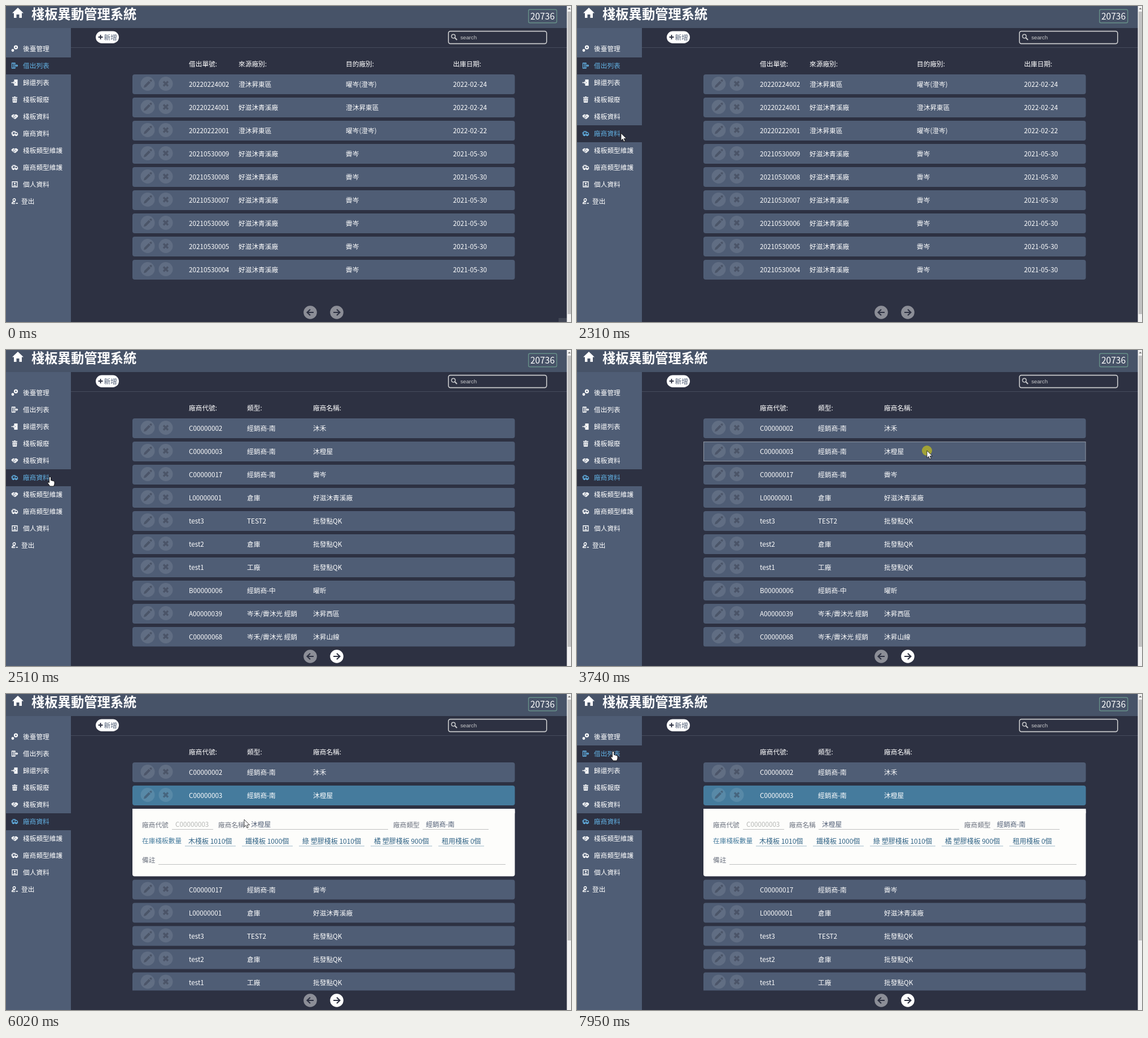
Recreate the animation shown at these times as an HTML page. Size 1001 by 559 pixels, loop 8 s.

```html
<!DOCTYPE html>
<html lang="zh-Hant">
<head>
<meta charset="utf-8">
<title>棧板異動管理系統</title>
<style>
html, body { margin: 0; width: 100%; height: 100%; overflow: hidden; background: #2d3142; }
svg { display: block; width: 1001px; height: 559px; }
text { font: 11.7px 'Noto Sans CJK TC', 'Noto Sans CJK JP', 'Noto Sans', sans-serif; fill: #fff; white-space: pre; }
.title { font-size: 23.3px; font-weight: 700; }
.badge { font-size: 15.5px; }
.search { font: 9.7px 'Liberation Sans', Arial, sans-serif; fill: #c8c9cb; }
.item { color: #fff; }
.item text { fill: currentColor; }
.item > rect { fill: none; }
.item.on { color: #62b0e2; }
.item.on > rect { fill: #2d3142; }
.row > rect { fill: #4f5d75; x: 224px; y: 0; width: 677.5px; height: 35px; rx: 4px; }
.row.hover > rect { stroke: #8f98a6; x: 224.5px; y: .5px; width: 676.5px; height: 34px; rx: 0; }
.row.open > rect { fill: #457b9d; }
.btn { fill: #fff; opacity: .1; }
.glyph { fill: #2d3142; opacity: .4; }
.line { fill: none; stroke: currentColor; stroke-width: 2.6; }
.label { fill: #6d7380; }
.value { fill: #4f5d75; }
.dim { fill: #b4b6b4; }
.stock { fill: #457b9d; }
.count { fill: #2f6285; font-size: 12px; }
.off { opacity: .45; }
</style>
</head>
<body>
<svg id="stage" viewBox="0 0 1001 559"></svg>
<script>
const text = (x, mid, s, cls = '', size = 11.7) =>
  `<text x="${x}" y="${mid + size * 0.37}" class="${cls}">${s}</text>`;
const rect = (x, y, w, h, fill, r = 0) =>
  `<rect x="${x}" y="${y}" width="${w}" height="${h}" fill="${fill}" rx="${r}"/>`;
const rule = (x1, x2, y, color) =>
  `<path d="M${x1} ${y}H${x2}" stroke="${color}" fill="none"/>`;

// Icons on a 24 unit grid
const pallet = '<path fill="currentColor" d="M0 9L7 4 12 6 17 4 24 9 22 14 14 21 10 20 2 14Z"/><path d="M6 10L11 8 18 14M5 13L11 18M9 12L14 17" fill="none" stroke="#4f5d75" stroke-width="1.8"/>';
const truck = '<path class="line" d="M4 5H13V17H2M0 9H7M0 13H6M13 8H18L22 12V17H13"/><g fill="currentColor"><circle cx="7" cy="18" r="3.5"/><circle cx="17" cy="18" r="3.5"/></g>';
const icons = [
  '<circle class="line" style="stroke-width:4.5" cx="16" cy="7" r="5"/><circle class="line" style="stroke-width:4" cx="5" cy="18" r="2.8"/>',
  '<path class="line" d="M2 3H13V21H2ZM8 3V21M14 12H22M18 8L22 12 18 16"/>',
  '<path fill="currentColor" d="M10 1H22V23H10V16L16 12 10 8Z"/><path class="line" d="M0 12H11M8 8L12 12 8 16"/>',
  '<path fill="currentColor" d="M3 3H9L10 1H14L15 3H21V6H3ZM4 8H20L19 23H5Z"/><path d="M9 11V20M15 11V20" stroke="#4f5d75" stroke-width="2"/>',
  pallet, truck, pallet, truck,
  '<path class="line" d="M3 3H21V21H3Z"/><circle cx="12" cy="9" r="3" fill="currentColor"/><path fill="currentColor" d="M6 18Q12 10 18 18Z"/>',
  '<circle class="line" cx="10" cy="7" r="4.5"/><path class="line" d="M2 21Q2 14 10 14L13 15M2 20H13M16 19H23"/>'
];
const menu = ['後臺管理', '借出列表', '歸還列表', '棧板報廢', '棧板資料', '廠商資料',
  '棧板類型維護', '廠商類型維護', '個人資料', '登出'];

const lent = '20220224002,澄沐昇東區,曜岑(澄岑),2022-02-24|20220224001,好滋沐青溪廠,澄沐昇東區,2022-02-24|20220222001,澄沐昇東區,曜岑(澄岑),2022-02-22'
  .split('|').map(r => r.split(','));
for (let n = 9; n > 3; n--) lent.push(['2021053000' + n, '好滋沐青溪廠', '霽岑', '2021-05-30']);
const firms = 'C00000002,經銷商-南,沐禾|C00000003,經銷商-南,沐橙屋|C00000017,經銷商-南,霽岑|L00000001,倉庫,好滋沐青溪廠|test3,TEST2,批發點QK|test2,倉庫,批發點QK|test1,工廠,批發點QK|B00000006,經銷商-中,曜昕|A00000039,岑禾/霽沐光 經銷,沐昇西區|C00000068,岑禾/霽沐光 經銷,沐昇山線'
  .split('|').map(r => r.split(','));

const row = (cells, cols, i) => `<g class="row" transform="translate(0 ${121 + 41 * i})"><rect/>
  <circle class="btn" cx="251" cy="16.5" r="12.5"/><circle class="btn" cx="283" cy="16.5" r="12.5"/>
  <path class="glyph" transform="translate(251 16.5)" d="M-7 7L-6 3 2-5 5-2-3 6ZM3-6L4.5-7.3Q6-8 7-7Q8-6 7.3-4.5L6-3Z"/>
  <path transform="translate(283 16.5)" d="M-4-4L4 4M4-4L-4 4" stroke="#2d3142" stroke-width="3.4" opacity=".4"/>
  ${cells.map((c, k) => text(cols[k], 18, c)).join('')}</g>`;
const table = (id, heads, cols, rows) => {
  const drawn = rows.map((r, i) => row(r, cols, i));
  return `<g id="${id}">${heads.map((h, k) => text(cols[k], 103, h)).join('')}
    <g clip-path="url(#list)">${drawn.slice(0, 2).join('')}<g class="rest">${drawn.slice(2).join('')}</g></g></g>`;
};

const field = (x1, x2, y, s, cls, color = '#bfc0c0') =>
  rule(x1, x2, y + 8.5, color) + text(x1 + 6, y, s, cls);
const stock = [[317, 407, '木棧板 1010個'], [418, 508, '鐵棧板 1000個'], [519, 635, '綠 塑膠棧板 1010個'],
  [646, 755, '橘 塑膠棧板 900個'], [766, 847, '租用棧板 0個']];
const panel = `<g id="panel">${rect(224, 203, 677.5, 119.5, '#fdfdfb', 4)}${rect(224, 203, 677.5, 8, '#fdfdfb')}
  ${text(241, 232, '廠商代號', 'label')}${field(294, 367, 231, 'C00000003', 'dim')}
  ${text(376, 232, '廠商名稱', 'label')}${field(428, 677, 231, '沐橙屋', 'value')}
  ${text(686, 232, '廠商類型', 'label')}${field(738, 855, 231, '經銷商-南', 'value')}
  ${text(241, 260, '在庫棧板數量', 'stock')}
  ${stock.map(([a, b, s]) => field(a, b, 260.5, s, 'count', '#9fb9c9')).join('')}
  ${text(241, 294, '備註', 'label')}${rule(270, 885, 301.5, '#bfc0c0')}</g>`;

const pager = (id, x, turn) => `<g id="${id}" class="off" transform="translate(${x} 542) rotate(${turn})">
  <circle r="11.8" fill="#fff"/><path d="M-6 0H5M0-5.3L5.5 0 0 5.3" fill="none" stroke="#2d3142" stroke-width="2.1"/></g>`;

const $ = id => document.getElementById(id);
$('stage').innerHTML = `
  <clipPath id="list"><rect x="220" y="115" width="690" height="409.5"/></clipPath>
  ${rect(0, 0, 1001, 559, '#2d3142')}${rect(0, 39, 115, 520, '#4f5d75')}${rect(0, 0, 994, 39, '#475368')}
  <path fill="#fff" d="M21 3L31 12.5H28V21H23.5V15H18.5V21H14V12.5H11Z"/>
  ${text(45, 14, '棧板異動管理系統', 'title', 23.3)}
  <rect x="925.7" y="6.2" width="50" height="23.6" rx="2.5" fill="none" stroke="#668f88" stroke-width="1.4"/>
  ${text(929, 18.7, '20736', 'badge', 15.5)}
  ${menu.map((s, i) => `<g class="item">${rect(0, 61 + 30 * i, 115, 30, '')}
    <g transform="translate(9.5 ${69.5 + 30 * i}) scale(.5)">${icons[i]}</g>${text(i < 9 ? 30 : 27, 76 + 30 * i, s)}</g>`).join('')}
  ${rule(115, 994, 73.5, '#464b5d')}
  ${rect(159, 44.5, 41, 21.5, '#fff', 10.7)}
  <path d="M163.5 55H171.5M167.5 51V59" stroke="#2d3142" stroke-width="2"/>
  ${text(173.5, 55.5, '新增', 'value')}
  <rect x="783.8" y="44.6" width="174" height="22" rx="3.5" fill="none" stroke="#c9cacc" stroke-width="1.6"/>
  <path d="M795.2 56.2L799 60" stroke="#c8c9cb" stroke-width="2"/><circle cx="792.6" cy="53.6" r="3.3" fill="none" stroke="#c8c9cb" stroke-width="1.5"/>
  ${text(805, 55.5, 'search', 'search', 9.7)}
  ${table('lent', ['借出單號:', '來源廠別:', '目的廠別:', '出庫日期:'], [324, 412, 602, 792], lent)}
  ${table('firms', ['廠商代號:', '類型:', '廠商名稱:'], [324, 427, 544], firms)}
  ${panel}${pager('prev', 539, 180)}${pager('next', 586, 0)}
  <g id="corner">${rect(979, 552, 15, 7, '#424755')}</g>
  ${rect(993.6, 0, 7.4, 559, '#f1f1f1')}<path d="M995.5 6L998 3 1000.5 6Z" fill="#777"/>
  <rect id="thumb" x="995" y="10" width="6" height="535" fill="#c1c1c1"/>
  <g id="mouse"><circle id="click" r="9" fill="#a1a236"/>
    <path id="arrow" d="M0 0V13L3 10.3 5 15 7.2 14 5.2 9.6H9.5Z" fill="#fff" stroke="#111" stroke-width=".8"/>
    <path id="hand" d="M-1.5 0Q0-1.5 1.5 0V5.5L7 7Q8 7.5 8 9V12L6.5 16H0L-4 10.5Q-4 8.5-2.8 8.7L-1.5 10Z" fill="#fff" stroke="#111" stroke-width=".9"/>
    <path id="beam" d="M-3-6.5Q0-6.5 0-5Q0-6.5 3-6.5M0-5V5M-3 6.5Q0 6.5 0 5Q0 6.5 3 6.5" fill="none" stroke="#333" stroke-width="1.1"/></g>`;

// Pointer path: time, x, y
const path = [[530, 986, 541], [1290, 188, 351], [1970, 78, 225], [2710, 78, 225], [3540, 620, 178],
  [4010, 620, 178], [4430, 624, 258], [4560, 624, 258], [4840, 509, 258], [5050, 462, 237],
  [5270, 408, 255], [5480, 455, 275], [5690, 510, 262], [5870, 466, 224], [6020, 422, 222],
  [6180, 417, 255], [6340, 460, 276], [6520, 496, 262], [6670, 494, 245], [7190, 494, 245],
  [7600, 205, 215], [7950, 64, 102], [8000, 64, 102]];
const slope = (i, k) => (path[i + 1][k] - path[i][k]) / (path[i + 1][0] - path[i][0]);
const tangent = (i, k) => {
  if (i === 0) return slope(0, k);
  if (i === path.length - 1) return 0;
  const a = slope(i - 1, k), b = slope(i, k);
  return a * b > 0 ? 2 * a * b / (a + b) : 0;
};
function pointer(t) {
  let i = 0;
  while (i < path.length - 2 && t >= path[i + 1][0]) i++;
  const span = path[i + 1][0] - path[i][0], n = Math.max(1, Math.round(span / 69));
  const u = Math.floor((t - path[i][0]) / span * n) / n;   // moves in steps of about 69 ms
  return [1, 2].map(k => {
    const a = path[i][k], b = path[i + 1][k];
    return a + (b - a) * u * u * (3 - 2 * u)
      + span * u * (1 - u) * (tangent(i, k) * (1 - u) - tangent(i + 1, k) * u);
  });
}

const items = [...document.querySelectorAll('.item')];
const firmRows = [...document.querySelectorAll('#firms .row')];
const rest = document.querySelector('#firms .rest');
const show = (id, on) => $(id).setAttribute('display', on ? 'inline' : 'none');

function draw() {
  const t = performance.now() % 8000;
  const second = t >= 2440, open = t >= 3810, seen = t >= 530;
  const [x, y] = seen ? pointer(t) : [-99, -99];
  const inMenu = seen && x < 115 && y >= 61 && y < 361;
  const over = inMenu ? Math.floor((y - 61) / 30) : -1;
  const inList = x > 224 && x < 902 && y >= 121;
  const line = inList && (y - 121) % 41 < 35 ? Math.floor((y - 121) / 41) : -1;

  items.forEach((el, i) => el.classList.toggle('on', i === (second ? 5 : 1) || i === over));
  firmRows.forEach((el, i) => {
    el.classList.toggle('hover', second && i === line && (!open || i < 2));
    el.classList.toggle('open', open && i === 1);
  });
  show('lent', !second);
  show('firms', second);
  show('panel', open);
  show('corner', !seen);
  rest.setAttribute('transform', `translate(0 ${open ? 125.5 : 0})`);
  $('next').setAttribute('class', second ? '' : 'off');
  $('thumb').setAttribute('height', open ? 426 : second ? 515 : 535);

  const inPanel = open && x > 224 && y > 203;
  const beam = inPanel && (x > 430 || y > 242);
  const hand = inMenu && !(t >= 2310 && t < 2510);
  show('mouse', seen);
  show('beam', beam);
  show('hand', hand);
  show('arrow', !beam && !hand);
  show('click', t >= 2240 && t < 2310 || t >= 3740 && t < 3810);
  $('mouse').setAttribute('transform', `translate(${x.toFixed(1)} ${y.toFixed(1)})`);
  requestAnimationFrame(draw);
}
draw();
</script>
</body>
</html>
```
